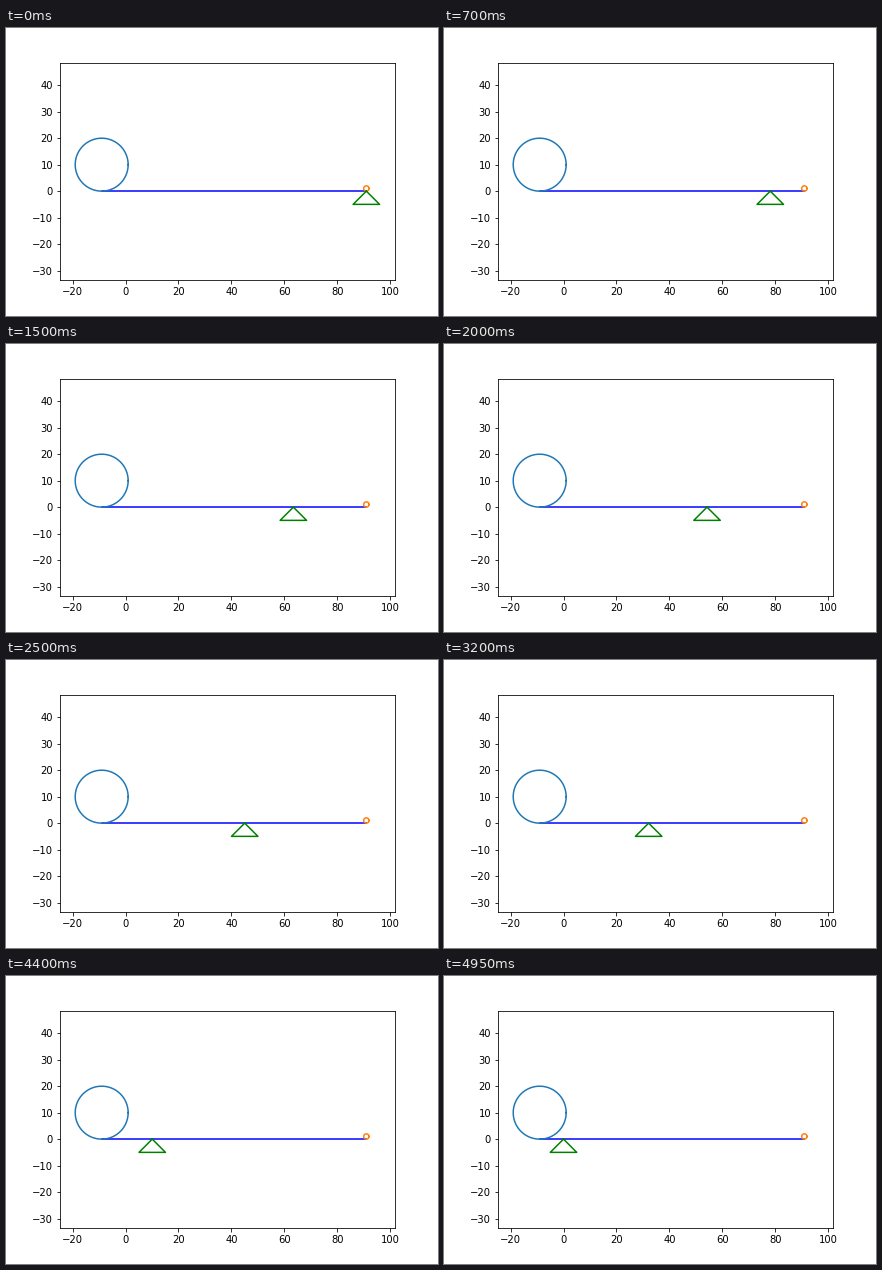
A matplotlib script that plays this animation: 432x288 px, repeating every 5 s.

```python
import numpy as np
import matplotlib.pyplot as plt
from matplotlib.animation import FuncAnimation

FRAMES = 100
INTERVAL = 50
LEFT, RIGHT = -9, 91        # ends of the beam
BIG, SMALL = 10, 1          # radii of the two balls
HALF_BASE, HEIGHT = 5, 5    # size of the pivot


def ball(x, radius, color):
    """Draw a circle resting on the beam at x."""
    t = np.linspace(0, 2 * np.pi, 100)
    ax.plot(x + radius * np.cos(t), radius + radius * np.sin(t), color=color)


def pivot_points(x):
    return [x, x - HALF_BASE, x + HALF_BASE, x], [0, -HEIGHT, -HEIGHT, 0]


fig, ax = plt.subplots(figsize=(6, 4), dpi=72, facecolor="white")
fig.subplots_adjust(left=0.125, right=0.9, bottom=0.125, top=0.88)

ax.plot([LEFT, RIGHT], [0, 0], color="blue")
ball(LEFT, BIG, "C0")
ball(RIGHT, SMALL, "C1")
pivot, = ax.plot(*pivot_points(RIGHT), color="green")

# Equal scale on both axes, with the usual 5 % margin across.
x_min, x_max = LEFT - BIG, RIGHT + HALF_BASE
margin = 0.05 * (x_max - x_min)
ax.set_xlim(x_min - margin, x_max + margin)
box = ax.get_position()
half_y = (x_max - x_min + 2 * margin) * (box.height * 4) / (box.width * 6) / 2
mid_y = (2 * BIG - HEIGHT) / 2
ax.set_ylim(mid_y - half_y, mid_y + half_y)
ax.set_xticks(range(-20, 101, 20))
ax.set_yticks(range(-30, 41, 10))


def update(i):
    pivot.set_data(*pivot_points(RIGHT * (1 - i / (FRAMES - 1))))
    return pivot,


anim = FuncAnimation(fig, update, frames=FRAMES, interval=INTERVAL,
                     repeat=True, repeat_delay=0)
plt.show()
```
